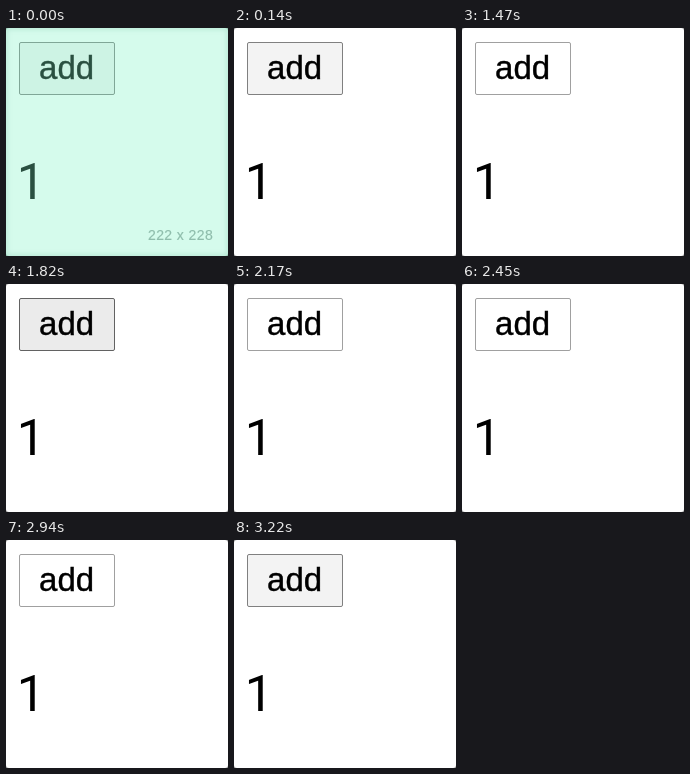
Animation of 222x228 px, one loop 3.71 s. Source, as an HTML page:

```html
<!DOCTYPE html>
<html lang="en">
<head>
<meta charset="utf-8">
<style>
  html, body { margin: 0; width: 100%; height: 100%; overflow: hidden; background: #888; }
  svg { display: block; }
  text { font-family: "Liberation Sans", Arial, sans-serif; }
  #label { font-size: 33px; stroke: #000; stroke-width: .4px; }
  #count { font-family: Roboto, sans-serif; font-size: 50.5px; }
  #size { font-size: 14px; letter-spacing: .4px; fill: #8fbdac; stroke: #8fbdac; stroke-width: .2px; }
</style>
</head>
<body>
<svg width="222" height="228" viewBox="0 0 222 228">
  <defs>
    <filter id="soft"><feGaussianBlur stdDeviation="2"/></filter>
  </defs>
  <rect width="222" height="228" rx="3" fill="#fff"/>
  <rect id="button" x="13.5" y="14.5" width="95" height="52" rx="1.5"/>
  <text id="label" x="33.1" y="51">add</text>
  <text id="count" x="10.7" y="171">1</text>
  <g id="flash">
    <rect width="222" height="228" fill="#7ff3c5" fill-opacity=".33"/>
    <rect width="222" height="228" fill="none" stroke="#8fd0b8" stroke-opacity=".5" stroke-width="3" filter="url(#soft)"/>
    <text id="size" x="142" y="212">222 x 228</text>
  </g>
</svg>
<script>
  const LOOP = 3710;
  const looks = {
    idle: ['#f3f3f3', '#808080'],
    hover: ['#ebebeb', '#626262'],
    press: ['#ffffff', '#a0a0a0'],
  };
  const hoverSpan = [1120, 3220];
  const presses = [
    [1260, 1330], [1470, 1540], [1680, 1820], [1890, 2030],
    [2170, 2310], [2450, 2520], [2660, 2800], [2940, 3010],
  ];
  const button = document.getElementById('button');
  const flash = document.getElementById('flash');

  function draw(now) {
    const t = now % LOOP;
    const within = ([start, end]) => t >= start && t < end;
    const state = presses.some(within) ? 'press' : within(hoverSpan) ? 'hover' : 'idle';
    const [fill, stroke] = looks[state];
    button.setAttribute('fill', fill);
    button.setAttribute('stroke', stroke);
    flash.setAttribute('opacity', t < 70 ? 1 : t < 140 ? 0.5 : 0);
  }

  const start = performance.now();
  function tick() {
    draw(performance.now() - start);
    requestAnimationFrame(tick);
  }
  tick();
</script>
</body>
</html>
```
